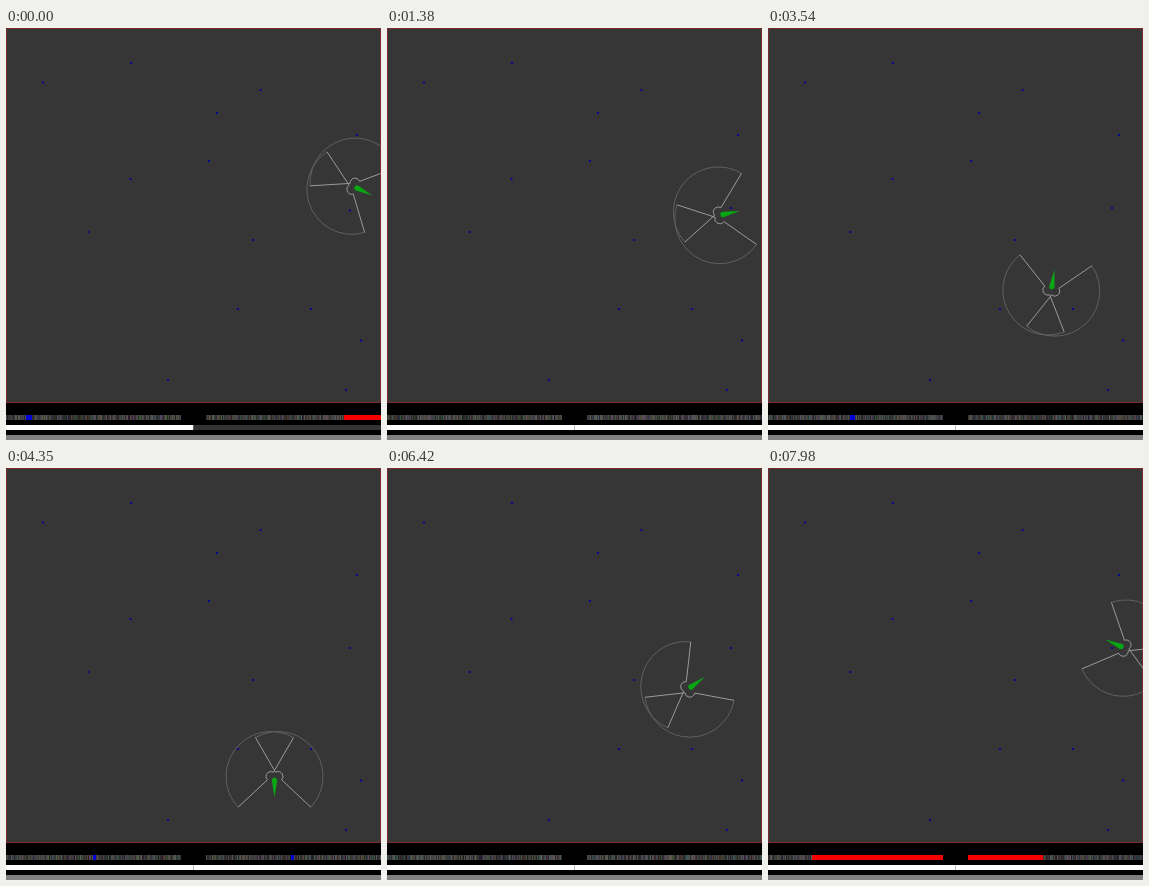
An HTML page with a canvas that plays this animation: 375 px wide and 412 px high, repeating every 8 s.

```html
<!DOCTYPE html>
<html lang="en">
<head>
<meta charset="utf-8">
<title>Foraging agent</title>
<style>
  html, body { margin: 0; width: 375px; height: 412px; overflow: hidden; background: #000; }
  canvas { display: block; }
</style>
</head>
<body>
<canvas id="stage" width="375" height="412"></canvas>
<script>
const ctx = document.getElementById('stage').getContext('2d');
const LOOP = 8000, TICK = 30, FIELD = 375, RETINA = 175;
const SIGHT = 45, EYE_RADIUS = 5, EYE_OFFSET = 5.3, SPEED = 0.15;
const rad = deg => deg * Math.PI / 180;

const food = [
  [125, 35], [37, 54.5], [254.5, 62], [211, 85], [351, 107], [203, 133], [124.5, 151], [82.5, 204],
  [247, 212], [232, 281], [305, 281], [355, 312.5], [340, 362], [162, 352]
];

// time, x, y, heading in degrees
const poses = [
  [0, 351, 160, 206.5], [1380, 336, 186.5, 168], [2730, 293.5, 204.5, 275.5],
  [4350, 268.5, 312.5, 270], [5310, 174, 266, 85], [6420, 304, 219, 143.5], [7980, 353, 178.5, 24]
];

// each eye: angle of its offset, then the limits of its field, all relative to the heading
const eyes = [
  { x: 0, side: rad(-41), from: rad(-133), to: rad(30) },
  { x: 200, side: rad(41), from: rad(-30), to: rad(133) }
];

// Cubic path whose tangent is the heading, so the agent always moves forward
function poseAt(t) {
  let i = 0;
  while (i < poses.length - 2 && t >= poses[i + 1][0]) i++;
  const [t0, x0, y0, h0] = poses[i], [t1, x1, y1, h1] = poses[i + 1];
  const s = Math.min(1, (t - t0) / (t1 - t0)), pull = SPEED * (t1 - t0);
  const along = (p, q, m, n) => ({
    at: p + m * s + (3 * (q - p) - 2 * m - n) * s * s + (2 * (p - q) + m + n) * s ** 3,
    slope: m + 2 * (3 * (q - p) - 2 * m - n) * s + 3 * (2 * (p - q) + m + n) * s * s
  });
  const x = along(x0, x1, pull * Math.cos(rad(h0)), pull * Math.cos(rad(h1)));
  const y = along(y0, y1, pull * Math.sin(rad(h0)), pull * Math.sin(rad(h1)));
  return { x: x.at, y: y.at, heading: Math.atan2(y.slope, x.slope) };
}

function random(seed) {
  const v = Math.sin(seed * 12.9898) * 43758.5453;
  return v - Math.floor(v);
}

function look(x, y, angle, dots) {
  const dx = Math.cos(angle), dy = Math.sin(angle);
  for (const [fx, fy] of dots) {
    const ahead = (fx - x) * dx + (fy - y) * dy;
    const aside = Math.abs((fx - x) * dy - (fy - y) * dx);
    if (ahead > 0 && ahead < SIGHT && aside < 1) return '#0000d8';
  }
  const ex = x + SIGHT * dx, ey = y + SIGHT * dy;
  return ex < 0 || ey < 0 || ex > FIELD || ey > FIELD ? '#f80000' : null;
}

function noise(seed) {
  const base = 35 + 50 * random(seed);
  const channel = k => Math.round(base + 30 * (random(seed + k) - 0.5));
  return `rgb(${channel(0.31)},${channel(0.57)},${channel(0.83)})`;
}

function drawEye(eye, pose, dots, tick) {
  const x = pose.x + EYE_OFFSET * Math.cos(pose.heading + eye.side);
  const y = pose.y + EYE_OFFSET * Math.sin(pose.heading + eye.side);
  const from = pose.heading + eye.from, to = pose.heading + eye.to;

  ctx.lineWidth = 1;
  ctx.strokeStyle = '#606060';
  ctx.beginPath();
  ctx.arc(x, y, SIGHT, from, to);
  ctx.stroke();

  ctx.strokeStyle = '#9a9a9a';
  ctx.beginPath();
  ctx.moveTo(x + SIGHT * Math.cos(from), y + SIGHT * Math.sin(from));
  ctx.arc(x, y, EYE_RADIUS, from, to);
  ctx.lineTo(x + SIGHT * Math.cos(to), y + SIGHT * Math.sin(to));
  ctx.stroke();

  for (let i = 0; i < RETINA; i++) {
    const angle = from + (to - from) * (i + 0.5) / RETINA;
    ctx.fillStyle = look(x, y, angle, dots) || noise(eye.x + i + tick * 3.7 + 1);
    ctx.fillRect(eye.x + i, 387, 1, 5);
  }
}

function drawBody({ x, y, heading }) {
  ctx.save();
  ctx.translate(x, y);
  ctx.rotate(heading);
  ctx.fillStyle = '#08a612';
  ctx.beginPath();
  ctx.arc(0, 0, 2.7, -Math.PI / 2, Math.PI / 2);
  ctx.lineTo(-17, 0);
  ctx.fill();
  ctx.restore();
}

function bar(x, y, width, color) {
  ctx.fillStyle = color;
  ctx.fillRect(x, y, width, 5);
}

function draw(t) {
  const pose = poseAt(t);
  const dots = [...food, [344, t < 600 ? 182.5 : 180]];

  ctx.fillStyle = '#000';
  ctx.fillRect(0, 0, FIELD, 412);
  ctx.fillStyle = '#363636';
  ctx.fillRect(0, 0, FIELD, FIELD);
  ctx.strokeStyle = '#7a2c2c';
  ctx.lineWidth = 1;
  ctx.strokeRect(0.5, 0.5, FIELD - 1, FIELD - 1);

  ctx.fillStyle = '#0000a8';
  for (const [x, y] of dots) {
    ctx.beginPath();
    ctx.arc(x, y, 1.1, 0, 2 * Math.PI);
    ctx.fill();
  }
  for (const eye of eyes) drawEye(eye, pose, dots, t / TICK);
  drawBody(pose);

  const level = Math.round(51 + 204 * Math.min(1, t / 300));
  bar(0, 397, 187.5, '#fff');
  bar(187.5, 397, 187.5, `rgb(${level},${level},${level})`);
  bar(0, 407, FIELD, '#808080');
}

const start = performance.now();
function frame() {
  const t = (performance.now() - start) % LOOP;
  draw(Math.floor(t / TICK) * TICK);
  requestAnimationFrame(frame);
}
frame();
</script>
</body>
</html>
```
